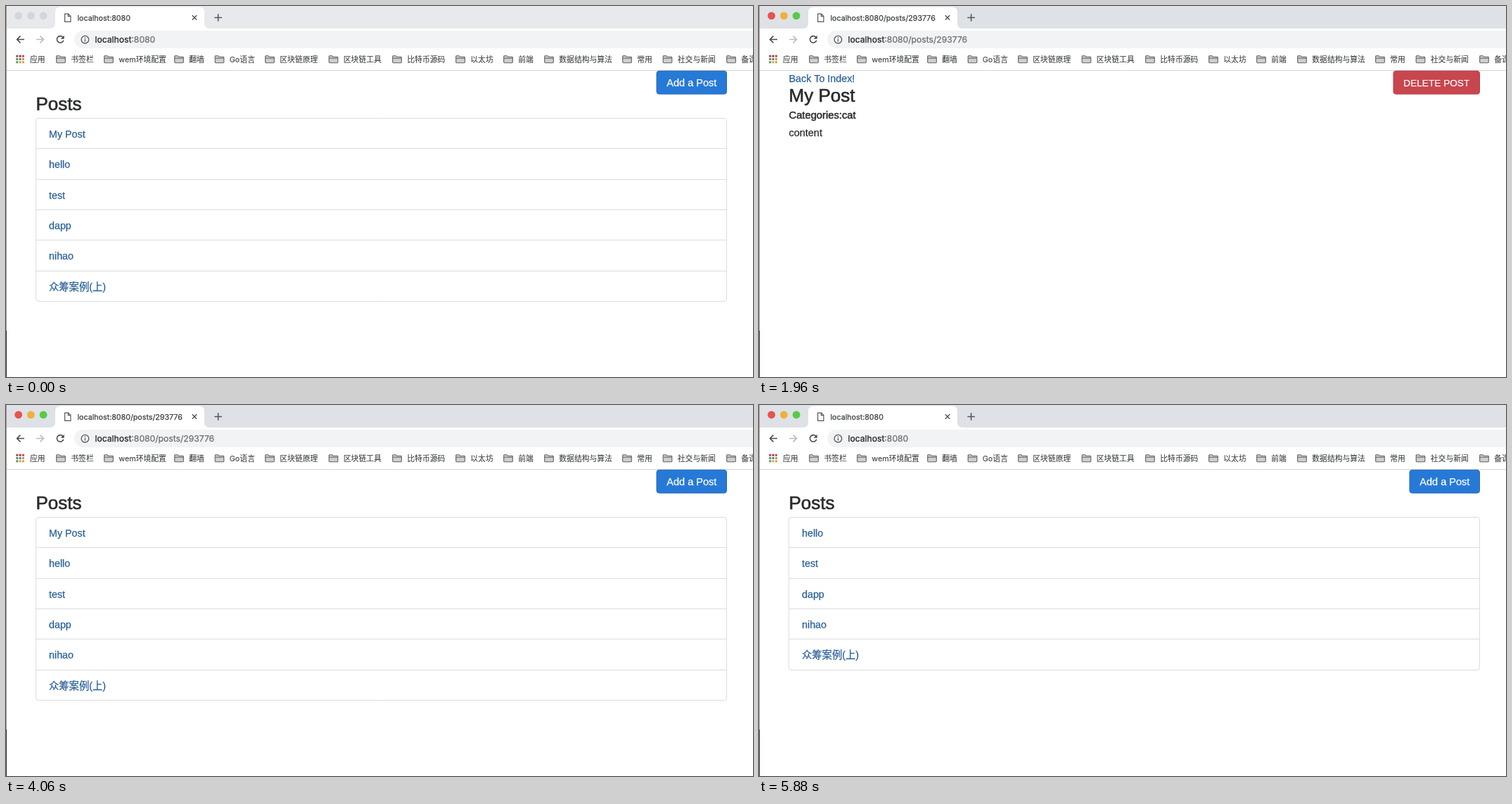
An HTML page with a canvas for the animation above (5950 ms loop, 1062 by 527 pixels).

```html
<!DOCTYPE html>
<html lang="zh-CN">
<head>
<meta charset="utf-8">
<title>Posts</title>
<style>
html, body { margin: 0; width: 100%; height: 100%; overflow: hidden; background: #fff; }
canvas { display: block; width: 1062px; height: 527px; }
</style>
</head>
<body>
<canvas id="stage" width="1062" height="527"></canvas>
<script>
const W = 1062, H = 527, LOOP = 5950;
const ctx = document.getElementById('stage').getContext('2d');

const UI = 'Inter, "Noto Sans CJK SC", "Noto Sans CJK", sans-serif';
const PAGE = '"Liberation Sans", "Noto Sans CJK SC", "Noto Sans CJK", sans-serif';
const INK = '#292b2c', LINK = '#2a6099', ICON = '#55585c', LINE = '#dcdcdc';

// Moments of the story, in ms
const ACTIVE = 1330, OPEN = 1820, OPEN_URL = 1890, HOVER = 2590, FOCUS = 3080;
const BACK = 4060, BACK_URL = 4200, REMOVED = 4340;

const posts = ['My Post', 'hello', 'test', 'dapp', 'nihao', '众筹案例(上)'];
const bookmarks = [
  [71, '书签栏'], [139, 'wem环境配置'], [239, '翻墙'], [296.5, 'Go语言'],
  [368, '区块链原理'], [458.5, '区块链工具'], [549, '比特币源码'], [639, '以太坊'],
  [707, '前端'], [765, '数据结构与算法'], [876, '常用'], [933.5, '社交与新闻'], [1024, '备课']
];

const clamp = v => Math.max(0, Math.min(1, v));
const ease = v => v * v * (3 - 2 * v);
const mix = (a, b, k) => `rgb(${a.map((v, i) => Math.round(v + (b[i] - v) * k))})`;

// Text with a thin outline that sets its weight
function text(str, x, y, size, color, family = PAGE, weight = 0.25) {
  ctx.font = `${size}px ${family}`;
  ctx.fillStyle = ctx.strokeStyle = color;
  ctx.lineWidth = weight;
  ctx.fillText(str, x, y);
  ctx.strokeText(str, x, y);
  return ctx.measureText(str).width;
}

function rect(x, y, w, h, color) {
  ctx.fillStyle = color;
  ctx.fillRect(x, y, w, h);
}

function box(x, y, w, h, r, fill, stroke) {
  ctx.beginPath();
  ctx.roundRect(x, y, w, h, r);
  if (fill) { ctx.fillStyle = fill; ctx.fill(); }
  if (stroke) { ctx.strokeStyle = stroke; ctx.lineWidth = 1; ctx.stroke(); }
}

function disc(x, y, r, color) {
  ctx.fillStyle = color;
  ctx.beginPath();
  ctx.arc(x, y, r, 0, Math.PI * 2);
  ctx.fill();
}

function path(d, color, width, fill) {
  const p = new Path2D(d);
  if (fill) { ctx.fillStyle = fill; ctx.fill(p); }
  ctx.strokeStyle = color;
  ctx.lineWidth = width;
  ctx.stroke(p);
}

function folder(x) {
  ctx.save();
  ctx.translate(x, 70);
  path('M.7 9.8V1.6Q.7.7 1.6.7H5L6.6 2.3H12.4Q13.3 2.3 13.3 3.2V9.8Q13.3 10.7 12.4 10.7H1.6Q.7 10.7.7 9.8Z', '#606060', 1.1, '#cfcfcf');
  path('M1 4.2H13', '#606060', 1);
  ctx.restore();
}

function tabStrip(t, url) {
  const on = t >= ACTIVE;
  rect(0, 0, W, 32, on ? '#dee1e6' : '#e7e9ed');
  const lights = on ? ['#e9524d', '#eeb13b', '#55cb47'] : Array(3).fill('#d3d5d8');
  lights.forEach((c, i) => disc(17.7 + i * 17.7, 13.9, 5.4, c));

  ctx.fillStyle = '#fff';
  ctx.fill(new Path2D('M62 32Q70 32 70 24V9Q70 1.5 77.5 1.5H274.5Q282 1.5 282 9V24Q282 32 290 32Z'));
  path('M83.6 11.1H88.6L91.9 14.4V22.4H83.6ZM88.4 11.3V14.7H91.7', ICON, 1.2);
  text(url, 101.5, 20.5, 10.7, '#3c4043', UI);
  path('M264.8 13.3L271.2 19.7M271.2 13.3L264.8 19.7', ICON, 1.5);
  path('M296.3 16.5H306.9M301.6 11.2V21.8', ICON, 1.6);
}

function toolbar(route) {
  rect(0, 32, W, 60, '#fff');
  path('M26 47.5H15.8M20.5 42.6L15.6 47.5L20.5 52.4', '#4a4d51', 1.6);
  path('M43 47.5H53.2M48.5 42.6L53.4 47.5L48.5 52.4', '#b9bbbe', 1.6);
  path('M80.8 44.2A4.8 4.8 0 1 0 81.8 48.8', '#4a4d51', 1.6);
  ctx.fillStyle = '#4a4d51';
  ctx.fill(new Path2D('M82.7 41.8V46.8H77.7Z'));

  box(97, 35, 1000, 25, 12.5, '#f1f3f4');
  path('M107.1 47.7a5.3 5.3 0 1 0 10.6 0a5.3 5.3 0 1 0 -10.6 0M112.4 47V50.6M112.4 44.6V45.9', ICON, 1.3);
  const w = text('localhost', 126.5, 52, 12.15, '#202124', UI);
  text(':8080' + route, 126.5 + w, 52, 12.15, '#6a6e73', UI);

  const dots = ['#b3403c', '#94413e', '#c04b45', '#54945a', '#4c7cc4', '#c9953c', '#5b9a50', '#d2a640', '#d7a33c'];
  dots.forEach((c, i) => rect(14.3 + i % 3 * 4.3, 69.7 + Math.floor(i / 3) * 4.3, 3, 3, c));
  text('应用', 34, 79.7, 10.8, '#3c4043', UI, 0.1);
  for (const [x, label] of bookmarks) {
    folder(x);
    text(label, x + 21.3, 79.7, 10.8, '#3c4043', UI, 0.1);
  }
  rect(0, 91, W, 1, '#d3d4d6');
}

function button(x, label, size, fill, edge) {
  box(x, 92.3, 1024.5 - x, 32.8, 3.5, fill, edge);
  text(label, x + 14.3, 114.2, size, '#fff');
}

function indexPage(list) {
  button(925, 'Add a Post', 14.5, '#2679d7', '#256bb8');
  text('Posts', 42.5, 147.8, 26, INK, PAGE, 0.6);
  const step = 43.35;
  box(42.5, 159.5, 982, Math.round(step * list.length), 3.5, '#fff', LINE);
  list.forEach((name, i) => {
    const y = 159 + Math.round(step * i);
    if (i) rect(43, y, 981, 1, LINE);
    text(name, 61, y + 27.5, 14.3, LINK);
  });
}

function postPage(t) {
  const hover = ease(clamp((t - HOVER) / 200));
  const ring = ease(clamp((t - FOCUS) / 140));
  const red = mix([200, 70, 77], [180, 37, 44], hover);
  const edge = mix([182, 62, 70], [152, 34, 42], hover);
  button(902, 'DELETE POST', 13.65, red, edge);
  if (ring) {
    ctx.save();
    ctx.beginPath();
    ctx.rect(899, 92, 129, 37);
    ctx.clip();
    ctx.globalAlpha = ring;
    ctx.shadowColor = '#6f86d8';
    ctx.shadowBlur = 3;
    ctx.strokeStyle = '#8a7fc0';
    ctx.lineWidth = 1.8;
    ctx.strokeRect(902.5, 93.3, 122, 31.7);
    ctx.restore();
  }
  text('Back To Index!', 42.5, 108, 14.3, LINK);
  text('My Post', 42.5, 135.6, 26, INK, PAGE, 0.6);
  text('Categories:cat', 42.5, 160.2, 14.75, INK, PAGE, 0.5);
  text('content', 42.5, 185.2, 14.46, INK);
}

function draw(t) {
  const route = t >= OPEN_URL && t < BACK_URL ? '/posts/293776' : '';
  rect(0, 0, W, H, '#fff');
  tabStrip(t, 'localhost:8080' + route);
  toolbar(route);
  if (t >= OPEN && t < BACK) postPage(t);
  else indexPage(t >= REMOVED ? posts.slice(1) : posts);
  // Desktop showing along the window edge
  rect(0, 0, 1, 461, '#a8948a');
  rect(0, 461, 1, 66, '#2b2b2e');
}

function tick(now) {
  draw(now % LOOP);
  requestAnimationFrame(tick);
}
draw(0);
requestAnimationFrame(tick);
</script>
</body>
</html>
```
